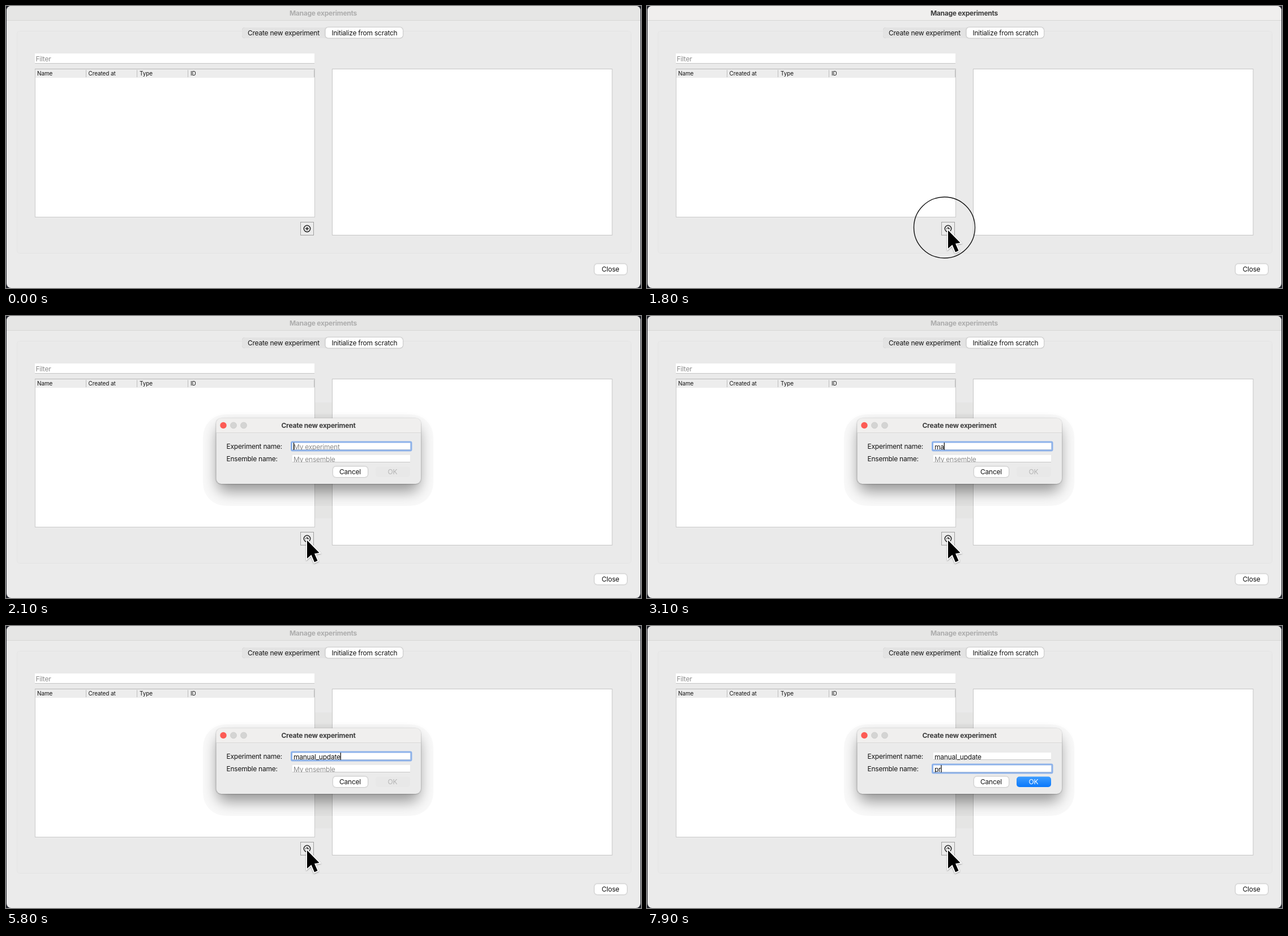
Write an HTML page that moves like this. It is 1122x499 px and loops after 8 s.

```html
<!DOCTYPE html>
<html lang="en">
<head>
<meta charset="utf-8">
<title>Manage experiments</title>
<style>
  html, body { margin: 0; width: 100%; height: 100%; overflow: hidden; background: #23252d; }
  #stage { display: block; }
  text { font: 12px Inter, "Noto Sans", sans-serif; letter-spacing: -.02em; fill: #141414; white-space: pre; }
  .title { font-weight: 700; text-anchor: middle; fill: #3d3d3d; }
  .head { font-size: 10px; letter-spacing: -.01em; }
  .hint { fill: #8b8b8b; }
  .mid { text-anchor: middle; }
  .button { fill: #fff; filter: drop-shadow(0 .5px .8px rgba(0, 0, 0, .35)); }
  .line { fill: none; stroke: #c6c6c6; }
  .focus { fill: none; stroke: #8db2ea; stroke-width: 3; }
  .inactive #bar { fill: #e6e6e5; }
  .inactive #caption { fill: #adadad; }
</style>
</head>
<body>
<svg id="stage" width="1122" height="499" viewBox="0 0 1122 499">
  <defs>
    <clipPath id="frame"><rect x="1" width="1120" height="499" rx="8"/></clipPath>
    <clipPath id="card"><rect x="371.5" y="181" width="361.5" height="116" rx="9"/></clipPath>
    <linearGradient id="blue" x2="0" y2="1">
      <stop stop-color="#3e9dff"/><stop offset="1" stop-color="#0a78fb"/>
    </linearGradient>
    <filter id="blur" x="-20%" y="-50%" width="140%" height="200%"><feGaussianBlur stdDeviation="13"/></filter>
    <filter id="edge"><feGaussianBlur stdDeviation="1.2"/></filter>
  </defs>

  <g id="main" clip-path="url(#frame)">
    <rect width="1122" height="499" fill="#ebebeb"/>
    <rect id="bar" width="1122" height="25" fill="#f0efee"/>
    <path d="M0 25.5H1122" stroke="#d6d6d5"/>
    <text id="caption" class="title" x="560.5" y="16.5">Manage experiments</text>
    <rect x="19.5" y="44.5" width="1085" height="393" rx="4" fill="#eaeaea" stroke="#e4e4e4"/>
    <rect id="haze" x="330" y="153" width="440" height="205" rx="30" fill="#e5e5e4"/>

    <rect x="417" y="38" width="284" height="19" rx="5" fill="#e3e3e3" style="filter:drop-shadow(0 .5px .6px rgba(0,0,0,.3))"/>
    <rect class="button" x="564.5" y="38" width="136.5" height="18.5" rx="5"/>
    <text x="427" y="52">Create new experiment</text>
    <text x="575.5" y="52">Initialize from scratch</text>

    <rect x="51" y="84" width="494" height="18" fill="#fff"/>
    <path class="line" d="M51 101.5H545"/>
    <text class="hint" x="52.5" y="98">Filter</text>

    <rect x="51.5" y="111.5" width="494" height="262" fill="#fff" stroke="#cacaca"/>
    <rect x="52" y="112" width="493" height="15" fill="#ededed"/>
    <path class="line" d="M141.5 113V126M231.5 113V126M321.5 113V126M544.5 113V126" style="stroke:#bdbdbd"/>
    <path class="line" d="M51 111.5H546M576 111.5H1071" style="stroke:#b6b6b6"/>
    <text class="head" x="55" y="122.5">Name</text>
    <text class="head" x="145.5" y="122.5">Created at</text>
    <text class="head" x="236" y="122.5">Type</text>
    <text class="head" x="326" y="122.5">ID</text>
    <rect x="576.5" y="111.5" width="494.5" height="294" fill="#fff" stroke="#c6c6c6"/>

    <rect x="520.5" y="382.5" width="23" height="23" fill="#ececec" stroke="#a0a0a0"/>
    <g fill="none" stroke="#222" stroke-width="1.5">
      <circle cx="532" cy="394" r="5.7"/>
      <path d="M529 394H535M532 391V397"/>
    </g>
    <rect class="button" x="1040" y="456.5" width="57" height="18.5" rx="5"/>
    <text class="mid" x="1068" y="469.5">Close</text>
  </g>

  <g id="dialog">
    <rect x="348" y="174" width="407" height="162" rx="40" fill="#000" opacity=".025"/>
    <rect x="374" y="196" width="356" height="114" rx="14" opacity=".4" filter="url(#blur)"/>
    <rect x="371" y="181.5" width="362" height="116" rx="9.5" opacity=".3" filter="url(#edge)"/>
    <g clip-path="url(#card)">
      <rect x="371" y="181" width="362" height="116" fill="#ebebeb"/>
      <rect x="371" y="181" width="362" height="25" fill="#f0efee"/>
      <path d="M371 206.5H733" stroke="#d9d9d8"/>
    </g>
    <circle cx="384" cy="193.5" r="5.7" fill="#fc5b55"/>
    <g fill="#d4d4d3" stroke="#c6c6c5" stroke-width=".6">
      <circle cx="402" cy="193.5" r="5.5"/><circle cx="420" cy="193.5" r="5.5"/>
    </g>
    <text class="title" x="552" y="197.5">Create new experiment</text>
    <text x="389.5" y="235">Experiment name:</text>
    <text x="389.5" y="257">Ensemble name:</text>
    <g id="fields"></g>
    <rect class="button" x="578" y="266.5" width="61" height="18.5" rx="5"/>
    <text class="mid" x="608" y="279.5">Cancel</text>
    <rect id="ok" x="653" y="266.5" width="61" height="18.5" rx="5"/>
    <text id="okText" class="mid" x="683" y="279.5">OK</text>
  </g>

  <circle id="ring" cx="525.5" cy="392" r="54" fill="none" stroke="#111" stroke-width="1.4"/>
  <path id="cursor" d="M0 0V32L7.5 25.5L13 38.5L18.5 36L13 23.5L21.5 22Z" stroke="#fff" stroke-width="3.6"
        paint-order="stroke" style="filter:drop-shadow(0 1px 1.2px rgba(0,0,0,.35))"/>
</svg>

<script>
const LOOP = 8000, STEP = 100;
const $ = id => document.getElementById(id);
const show = (el, on) => el.setAttribute('visibility', on ? 'inherit' : 'hidden');

// Each pair: time, number of letters typed by then.
const experiment = { word: 'manual_update', keys: [[2700, 1], [3100, 2], [3300, 3], [3400, 4], [3700, 5], [3900, 6],
  [4500, 7], [4800, 8], [5100, 9], [5300, 10], [5400, 11], [5800, 13]] };
const ensemble = { word: 'pr', keys: [[7500, 1], [7700, 2]] };
const caretOff = [[2400, 2700], [6400, 6600], [7300, 7500]];
const SWITCH = 6600;

function makeField(y, hint) {
  const g = document.createElementNS('http://www.w3.org/2000/svg', 'g');
  g.innerHTML = `
    <rect x="506" y="${y}" width="208" height="13" fill="#fff"/>
    <path class="line" d="M506 ${y + 12.5}H714"/>
    <rect class="focus" x="504.5" y="${y - 1}" width="211.5" height="15" rx="1.5"/>
    <svg x="506" y="${y}" width="208" height="13">
      <text class="hint" x="2" y="11.5">${hint}</text>
      <text class="typed" x="2" y="11.5"></text>
      <path class="caret" d="M0 0V13" stroke="#000" stroke-width="1.2"/>
    </svg>`;
  $('fields').append(g);
  const [focus, placeholder, typed, caret] =
    ['.focus', '.hint', '.typed', '.caret'].map(s => g.querySelector(s));
  return (value, focused, caretOn) => {
    typed.textContent = value;
    show(placeholder, !value);
    show(focus, focused);
    show(caret, focused && caretOn);
    const x = 2.5 + (value ? typed.getComputedTextLength() : 0);
    caret.setAttribute('transform', `translate(${x} 0)`);
  };
}
const drawExperiment = makeField(224, 'My experiment');
const drawEnsemble = makeField(246, 'My ensemble');

const typedAt = ({ word, keys }, t) =>
  word.slice(0, keys.reduce((n, [at, count]) => t >= at ? count : n, 0));

function cursorAt(t) {
  if (t >= 1600) return [532, 397];
  if (t >= 1500) return [533, 401];
  const rest = (1 - Math.min(1, (t - 600) / 800)) ** 2;
  return [535 + 105 * rest, 407 + 84 * rest];
}

function draw(t) {
  $('main').classList.toggle('inactive', t < 1800 || t >= 2000);
  show($('ring'), t >= 1800 && t < 1900);
  show($('cursor'), t >= 600);
  $('cursor').setAttribute('transform', `translate(${cursorAt(t)})`);

  const open = t >= 2000, growing = t < 2100;
  for (const el of [$('dialog'), $('haze')]) {
    show(el, open);
    el.setAttribute('transform', growing ? 'translate(551.5 238.7) scale(.645) translate(-552 -239)' : '');
    el.setAttribute('opacity', growing ? .8 : 1);
  }

  const caretOn = !caretOff.some(([from, to]) => t >= from && t < to);
  const second = typedAt(ensemble, t);
  drawExperiment(typedAt(experiment, t), t < SWITCH, caretOn);
  drawEnsemble(second, t >= SWITCH, caretOn);
  $('ok').setAttribute('fill', second ? 'url(#blue)' : '#e8e8e8');
  $('okText').style.fill = second ? '#fff' : '#b4b4b4';
}

function tick() {
  draw(Math.floor(performance.now() % LOOP / STEP) * STEP);
  requestAnimationFrame(tick);
}
tick();
</script>
</body>
</html>
```
